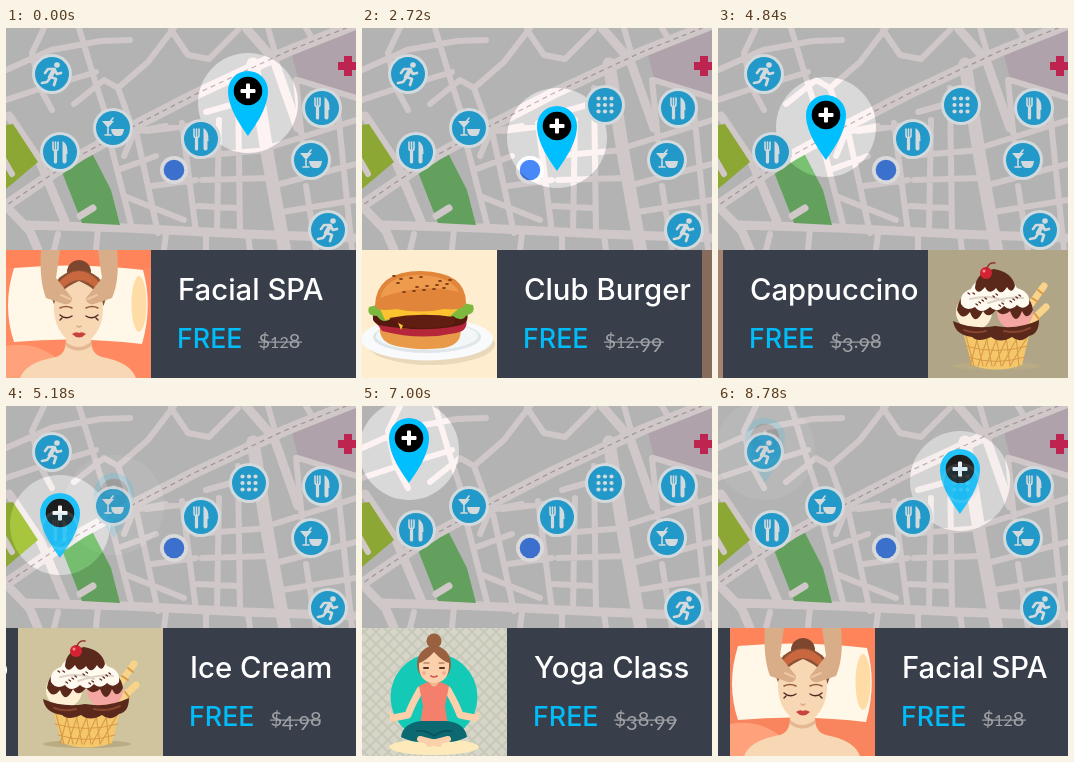
An HTML page that plays this animation: 350x350 px, repeating every 8800 ms.

```html
<!DOCTYPE html>
<html lang="en">
<head>
<meta charset="utf-8">
<title>Map offers</title>
<style>
html, body { margin: 0; width: 100%; height: 100%; overflow: hidden; }
#stage { display: block; width: 350px; height: 350px; }
.title { font: 500 29.3px Inter, "Open Sans", sans-serif; fill: #fff; }
.free { font: 500 26.8px Inter, "Open Sans", sans-serif; fill: #00bdf9; }
.price { font: 20px Lato, sans-serif; fill: #a0a2a5; }
.spot { mix-blend-mode: color-dodge; }
.line { fill: none; stroke-linecap: round; stroke-linejoin: round; }
</style>
</head>
<body>
<svg id="stage" viewBox="0 0 350 350"></svg>
<script>
const LOOP = 8800, STEP = 20, FADE = 140, W = 350;
const slides = [
  { title: 'Facial SPA', price: '$128', strike: 44, pin: [242, 63], bg: '#ff8960', art: facial },
  { title: 'Club Burger', price: '$12.99', strike: 60, pin: [195, 98], bg: '#ffedd0', art: burger },
  { title: 'Cappuccino', price: '$3.98', strike: 51, pin: [108, 87], bg: '#a48471', art: coffee },
  { title: 'Ice Cream', price: '$4.98', strike: 51, pin: [54, 107], bg: '#d6c9a3', art: sundae },
  { title: 'Yoga Class', price: '$38.99', strike: 63, pin: [47, 32], bg: '#d6d5c7', art: yoga }
];
// [start, duration] of each move to the next slide
const moves = [[1000, 600], [2700, 700], [4600, 600], [6400, 600], [8200, 600]];

// Shape helpers
const path = (d, fill) => `<path d="${d}" fill="${fill}"/>`;
const line = (d, color, w, extra = '') =>
  `<path class="line" d="${d}" stroke="${color}" stroke-width="${w}" ${extra}/>`;
const oval = (x, y, rx, ry, fill, extra = '') =>
  `<ellipse cx="${x}" cy="${y}" rx="${rx}" ry="${ry}" fill="${fill}" ${extra}/>`;
const dot = (x, y, r, fill, extra) => oval(x, y, r, r, fill, extra);
const box = (x, y, w, h, fill, r = 0) =>
  `<rect x="${x}" y="${y}" width="${w}" height="${h}" rx="${r}" fill="${fill}"/>`;
const range = (n, f) => Array.from({ length: n }, (_, i) => f(i)).join('');

function map() {
  const road = '#d0c8c8', rail = 'M-5 181L30 157 75 127 130 97 190 66 280 24 350 -4';
  return box(0, 0, W, 224, '#b3b3b3') +
    path('M285 23L350 0V67L292 50Z', '#afa2aa') +
    line('M0 42L45 22 95 13 124 12M73 0L88 50 99 84M38 0L26 25 34 60 46 82M0 72L30 62 90 44' +
      'M68 76L98 52 112 60 128 104 160 98M128 104L118 128M112 60L142 34 168 0' +
      'M165 2L182 27 203 31 232 2M262 0L270 28M300 0L307 12M130 103L152 205M140 103L182 98' +
      'M105 118L126 200M112 142L150 128M118 168L178 192M146 158L190 152M176 95L190 204' +
      'M213 92L211 203M232 60L234 205M190 128L262 122M196 152L264 150M192 178L230 180' +
      'M200 84L250 70M268 118L350 92M270 157L350 136M276 184L350 172M300 158L310 222' +
      'M330 64L346 222M290 52L296 112M292 52L350 70M160 206L158 222M200 207V222M242 207L244 222' +
      'M52 206L48 222M92 200L90 222', road, 6) +
    line('M0 178L24 203 32 222M20 197L120 200 240 206 350 210M3 88L34 134 60 196M240 0L268 32 292 100', road, 9) +
    line('M247 36L262 130 279 224', road, 13) +
    path('M0 97L7 96 32 134 0 161Z', '#8da734') +
    line('M-2 132L6 146', road, 6) +
    path('M56 144L86 125 105 162 114 197 76 195Z', '#63a05e') +
    line('M74 188L87 180', road, 7) +
    line(rail, road, 11) +
    line(rail, '#9c9496', 1.2, 'stroke-dasharray="5 4" style="stroke-linecap:butt"') +
    box(332, 34, 20, 8, '#bd2450') + box(338, 28, 8, 20, '#bd2450') +
    dot(168, 142, 14, '#d9d9db') + dot(168, 142, 10.3, '#3b70cc');
}

const ink = '#d3dadd';
const glyphs = {
  run: dot(5, -9, 2.8, ink) + line('M2 -4L-2 3', ink, 4.5) +
    line('M-1 3L4 5 2 11M-2 4L-5 8 -10 9M-7 -1L-4 -5 2 -5 5 0 9 -1', ink, 2.7),
  fork: line('M-7 -10V-4Q-7 -1 -4.5 -1T-2 -4V-10M-4.5 -10V-2', ink, 1.6) +
    line('M-4.5 0V10', ink, 3.2) + path('M2.5 -11Q8 -8 7.5 2H6.5V10Q4.5 13 2.5 10Z', ink),
  drink: path('M-11 -7H1L-5 0Z', ink) + line('M-5 0V7M-8 7H-2M-3 -6L0 -10', ink, 1.6) +
    path('M-2 1H11Q10 8 7 8H3Q-1 8 -2 1Z', ink),
  grid: range(9, i => dot(i % 3 * 6.5 - 6.5, (i / 3 | 0) * 6.5 - 6.5, 2.1, ink))
};
const icon = (kind, x, y, id = '') => `<g id="${id}" transform="translate(${x} ${y})">` +
  dot(0, 0, 20, ink) + dot(0, 0, 17, '#2299c8') + glyphs[kind] + '</g>';

const pin = ({ pin: [x, y] }, i) => `<g id="pin${i}" transform="translate(${x} ${y})">` +
  path('M0 45C-6 36 -20 18 -20 0A20 20 0 0 1 20 0C20 18 6 36 0 45Z', '#00bfff') +
  dot(0, 0, 14.3, '#000') + box(-7.5, -2, 15, 4, '#fff', 1) + box(-2, -7.5, 4, 15, '#fff', 1) + '</g>';

function facial() {
  const skin = '#f7d7b4', arm = '#d8ad87';
  return path('M0 318Q40 310 70 350H0Z', '#ffa27c') + path('M0 222H145V240H0Z', '#ff845a') +
    path('M8 240Q70 234 137 242Q147 278 136 316Q70 308 8 314Q-4 278 8 240Z', '#fff8e8') +
    oval(133, 276, 7.5, 28, '#ffdba6') +
    path('M14 350Q20 334 50 329Q60 326 60 312H85Q85 326 96 329Q124 334 130 350Z', skin) +
    path('M60 314Q72 324 85 314V318Q72 327 60 318Z', '#e4b892') +
    dot(73, 244, 12, '#7d472f') + oval(73, 267, 27, 25, '#8b5236') +
    path('M51 256Q73 230 95 256L91 262Q73 242 55 262Z', '#c9683f') +
    path('M48 276Q52 262 73 253Q94 262 97 276Q98 300 84 312Q73 321 62 312Q47 300 48 276Z', skin) +
    path('M35 222H54L50 250 66 270Q66 277 58 276L40 270Q33 252 35 222Z', arm) +
    path('M92 222H111Q114 252 106 270L88 276Q80 277 80 270L96 250Z', arm) +
    line('M55 267L64 271M91 267L82 271', '#efc7a0', 2) +
    line('M54 287Q60 292 66 288M80 288Q86 292 92 287M56 290L54 292M90 290L92 292', '#4e2b20', 1.4) +
    line('M54 280Q60 277 66 280M80 280Q86 277 92 280', '#945a3b', 1.5) +
    line('M71 298Q73 300 75 298', '#dba982', 1.5) +
    path('M66 306Q70 303 73 305Q76 303 80 306Q73 313 66 306Z', '#c8433f');
}

function burger() {
  return oval(79, 316, 64, 21, '#ead8bb') + oval(75, 311, 66, 21.5, '#f8fafb') +
    oval(75, 309, 54, 16, '#dfe6ea') + oval(75, 308, 51, 14, '#f3f6f7') +
    path('M28 298H108Q112 316 92 320Q66 323 44 318Q26 314 28 298Z', '#e99a48') +
    path('M24 294Q68 310 114 290Q117 303 104 305Q68 313 30 303Z', '#b6263b') +
    path('M22 285H115Q118 296 105 298Q68 305 26 297Q18 292 22 285Z', '#55190f') +
    path('M17 279Q70 264 121 277Q124 285 115 287Q109 295 101 288Q90 295 80 288Q70 294 60 288Q49 294 42 288Q32 298 25 288Q14 288 17 279Z', '#7cb93e') +
    path('M28 281H106L96 290 87 287 78 299 67 288 55 288 49 302 44 290 33 292Z', '#fcc230') +
    path('M37 290Q68 284 102 289Q106 296 96 298Q68 302 52 298Z', '#601d12') +
    path('M23 278Q24 243 69 243Q114 244 114 275Q112 283 92 281Q68 286 44 281Q25 284 23 278Z', '#e0853a') +
    path('M28 270Q34 247 68 247Q98 248 107 264Q70 254 28 270Z', '#ef9b4d') +
    range(16, i => oval(42 + i * 23 % 59, 248 + i * 11 % 17, 2, 1.1, '#7a3d18'));
}

function coffee() {
  const cream = '#fce9d0', tan = '#e2c8a2';
  return oval(69, 334, 39, 10, '#8b6c5a') + oval(68, 332, 38, 9.5, '#fff') + oval(68, 331, 31, 6, '#dcdcdc') +
    line('M40 287Q22 280 21 294Q22 311 42 314', cream, 7) +
    path('M37 268H99L95 330Q68 350 42 330Z', cream) +
    [283, 302, 321].map((y, i) => path(`M${38 + i} ${y}Q68 ${y + 13} ${98 - i} ${y}V${y + 9}Q68 ${y + 22} ${38.5 + i} ${y + 9}Z`, tan)).join('') +
    oval(68, 268, 31, 10, '#fff1df') + oval(68, 269, 27.5, 8, '#704020') +
    path('M50 268Q58 261 68 266Q78 261 87 268Q80 276 68 276Q56 275 50 268Z', '#e8c79d') +
    line('M58 267Q68 274 79 267M63 265Q68 269 74 265M68 264V275', '#91592f', 1.5) +
    line('M65 256Q57 248 65 241T63 227M71 256Q65 248 71 241T69 230', '#c9bdb5', 2);
}

function sundae() {
  const choc = '#5a291b', cone = '#f5c76b', stripe = '#d99a48';
  return oval(69, 338, 44, 4, '#b9ab83') +
    line('M92 291L116 258M98 298L118 279', '#f8d48a', 7) +
    line('M98 278L104 282M104 270L110 274M110 262L115 266M107 286L111 291', stripe, 2) +
    path('M35 304H102L94 337Q68 346 44 337Z', cone) +
    range(6, i => line(`M${38 + i * 10} 308L${46 + i * 9} 338M${50 + i * 10} 308L${42 + i * 8} 338`, stripe, 1.1)) +
    line('M37 318Q68 327 100 318M40 329Q68 338 97 329', stripe, 1) +
    dot(46, 284, 18, '#fff0d5') + dot(87, 284, 18, '#f3a6a2') +
    path('M25 293Q45 302 67 298Q90 302 111 292Q111 306 101 308Q92 316 84 309Q72 316 63 309Q50 315 44 309Q27 307 25 293Z', choc) +
    line('M36 302Q46 306 58 303M76 303Q90 306 102 300', '#86452f', 2) +
    path('M29 282Q31 266 44 264L88 264Q103 267 105 282Q99 294 94 283Q88 299 82 283Q75 290 68 282Q60 292 55 283Q47 299 42 284Q34 294 29 282Z', choc) +
    path('M33 276Q31 265 43 261Q47 250 66 250Q84 249 89 260Q103 264 101 276Q95 283 89 277Q82 284 76 278Q69 286 62 279Q53 287 47 279Q38 284 33 276Z', '#fffaf0') +
    path('M47 260Q48 244 66 241Q84 244 87 258Q84 267 79 259Q73 269 68 260Q61 268 57 259Q50 268 47 260Z', choc) +
    line('M42 271Q62 266 76 273M60 275Q82 268 95 270', '#dfd3c7', 2) +
    range(14, i => line(`M${40 + i * 17 % 54} ${265 + i * 5 % 13}l1.5 1`, choc, 1.4)) +
    dot(58, 245, 6, '#d32232') + dot(56, 243, 1.5, '#ff8b8b') + line('M59 240Q61 234 67 235', '#8b2525', 1.3);
}

function yoga() {
  const skin = '#fbd0ab', hair = '#99613f', pants = '#0c6871';
  return range(40, i => line(`M${i * 12 - 170} 222l128 128M${i * 12 - 170} 350l128 -128`, '#c6c9b9', 2)) +
    dot(72, 291, 43.5, '#14c9b5') + oval(72, 341, 45, 8, '#fdeaba') +
    dot(72, 235, 7.5, hair) + oval(72, 258, 17, 18, hair) +
    box(67, 270, 10, 13, '#edb98f', 3) +
    path('M57 257Q64 255 72 246Q80 255 87 257Q88 276 72 277Q56 276 57 257Z', skin) +
    line('M58 284Q49 300 46 309L31 312M86 284Q95 300 98 309L113 312', skin, 7) +
    line('M31 312L28 307M113 312L116 307', skin, 3) +
    path('M57 280Q65 276 67 276Q72 285 77 276Q80 276 87 280L83 300 86 320H58L61 300Z', '#f57f6d') +
    path('M59 315H85Q103 317 105 331Q88 340 72 333Q56 340 39 331Q41 317 59 315Z', pants) +
    line('M58 333L77 338M86 333L67 338', skin, 6) +
    line('M55 325Q64 324 72 330Q80 324 89 325', '#095058', 1.5) +
    line('M62 262h4M78 262h4', '#583522', 2) + line('M62 257h5M77 257h5', hair, 1.2) +
    line('M69 270Q72 272 75 270', '#d5534f', 1.7) + dot(62, 267, 2, '#f6ad94') + dot(82, 267, 2, '#f6ad94');
}

// Old-style figures: some small, some hanging below the baseline
function figures(text) {
  let drop = 0;
  return [...text].map(c => {
    const y = '34579'.includes(c) ? 4 : 0, dy = y - drop;
    drop = y;
    return `<tspan dy="${dy}" font-size="${'012'.includes(c) ? 16 : 20}">${c}</tspan>`;
  }).join('');
}

const card = (s, i) => `<g id="card${i}">` + box(144, 222, 206, 128, '#393f4a') +
  '<svg y="222" width="145" height="128" viewBox="0 222 145 128">' + box(0, 222, 145, 128, s.bg) +
  `<rect id="dim${i}" y="222" width="145" height="128"/>` + s.art() + '</svg>' +
  `<text class="title" x="172" y="271.5">${s.title}</text><text class="free" x="171" y="320">FREE</text>` +
  `<text class="price" x="252.5" y="320">${figures(s.price)}</text>` +
  box(252, 313.5, s.strike, 1.2, '#a0a2a5') + '</g>';

const stage = document.getElementById('stage');
stage.innerHTML = map() +
  slides.map(({ pin: [x, y] }, i) => dot(x, y + 12, 50, '#2d2d2d', `id="spot${i}" class="spot"`)).join('') +
  slides.map(pin).join('') +
  icon('grid', 243, 77, 'icon0') + icon('fork', 195, 111, 'icon1') + icon('drink', 107, 100, 'icon2') +
  icon('fork', 54, 124, 'icon3') + icon('run', 46, 46, 'icon4') +
  icon('fork', 316, 80) + icon('drink', 305, 132) + icon('run', 322, 202) +
  slides.map(card).join('');

const parts = slides.map((_, i) => Object.fromEntries(
  ['spot', 'pin', 'icon', 'card', 'dim'].map(k => [k, document.getElementById(k + i)])));
const clamp = v => Math.max(0, Math.min(1, v));

function draw(now) {
  const t = Math.floor(now % LOOP / STEP) * STEP;
  const from = Math.max(0, moves.filter(m => t >= m[0]).length - 1);
  const to = (from + 1) % slides.length;
  const [start, span] = moves[from];
  const shift = Math.round(W * clamp((t - start) / span));
  const fade = clamp((t - start - span + FADE) / FADE);
  parts.forEach((p, i) => {
    const shown = i === from ? 1 - fade : i === to ? fade : 0;
    const x = i === from ? -shift : i === to ? W - shift : W;
    p.spot.style.opacity = p.pin.style.opacity = shown;
    p.icon.style.opacity = 1 - shown;
    p.card.setAttribute('transform', `translate(${x} 0)`);
    p.dim.style.opacity = i === to ? 0.18 * (1 - fade) : 0;
  });
}

const begin = performance.now();
function tick() {
  draw(performance.now() - begin);
  requestAnimationFrame(tick);
}
tick();
</script>
</body>
</html>
```
